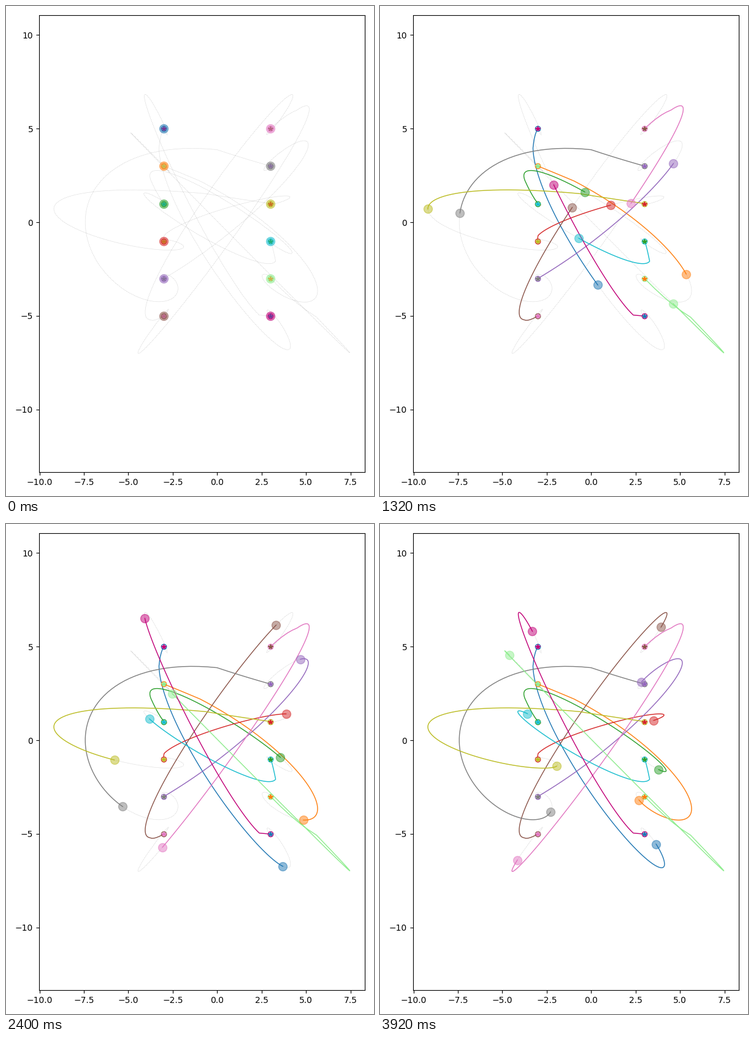
A matplotlib script that plays this animation: 600 by 800 pixels, repeating every 3.96 s.

```python
import numpy as np
import matplotlib.pyplot as plt
from matplotlib.animation import FuncAnimation

FRAMES, INTERVAL = 99, 40
STEPS = 300
SETTLE = 5  # steps until an agent is fully on its free path

# Damped spring towards the goal, x'' = -x - x', explicit Euler with dt = 0.05
ROOT = 1 - 0.05 * complex(0.5, -np.sqrt(0.75))
STEP = np.arange(STEPS)
MODE = ROOT ** STEP
MODES = np.stack([MODE.real, MODE.imag], axis=1)

# Each agent swaps places with the one opposite, through the origin.
COLORS = [f"C{i}" for i in range(10)] + ["lightgreen", "#c20078"]
STARTS = [np.array([x, y]) for x in (-3, 3) for y in range(5, -6, -2)]

# Two key points on each path, passed at these steps
KEY_STEPS = [23, 60]
KEY_POINTS = [
    [(-1.38, -0.78), (3.69, -6.73)],
    [(4.10, -1.25), (4.85, -4.26)],
    [(-2.22, 2.48), (3.55, -0.91)],
    [(-0.60, 0.42), (3.87, 1.41)],
    [(3.31, 1.68), (4.68, 4.33)],
    [(-2.91, -2.05), (3.31, 6.15)],
    [(4.25, 4.03), (-3.08, -5.71)],
    [(-6.36, 2.39), (-5.32, -3.54)],
    [(-8.29, 1.39), (-5.79, -1.05)],
    [(1.06, -1.69), (-3.81, 1.14)],
    [(6.86, -6.45), (-2.53, 2.49)],
    [(-0.57, -0.81), (-4.07, 6.51)],
]


def make_path(start, keys):
    """Spring path through the key points, eased in from the start."""
    goal = -start
    weights = np.linalg.solve(MODES[KEY_STEPS], np.array(keys) - goal)
    free = goal + MODES @ weights
    fade = np.clip(1 - (STEP / SETTLE) ** 2, 0, 1)
    return free + fade[:, None] * (start - free[0])


paths = [make_path(start, keys) for start, keys in zip(STARTS, KEY_POINTS)]

fig, ax = plt.subplots(figsize=(6, 8), dpi=100)
ax.set_xlim(-10.02, 8.3)
ax.set_ylim(-13.35, 11.06)
ax.set_xticks(np.arange(-10, 8, 2.5))
ax.set_yticks(range(-10, 11, 5))
fig.tight_layout()

for path in paths:
    ax.plot(*path.T, "k:", lw=0.5, alpha=0.3)
trails = [ax.plot([], [], color=c, lw=1)[0] for c in COLORS]
for color, start in zip(COLORS, STARTS):
    ax.plot(*start, "o", color=color, ms=6, mfc="none")
for color, start in zip(COLORS, STARTS):
    ax.plot(*-start, "*", color=color, ms=6)
dots = [ax.plot([], [], "o", color=c, ms=10, alpha=0.5)[0] for c in COLORS]


def update(frame):
    for trail, dot, path in zip(trails, dots, paths):
        trail.set_data(*path[:frame + 1].T)
        dot.set_data(*path[frame:frame + 1].T)
    return trails + dots


anim = FuncAnimation(fig, update, frames=FRAMES, interval=INTERVAL,
                     repeat=True, repeat_delay=0)
plt.show()
```
